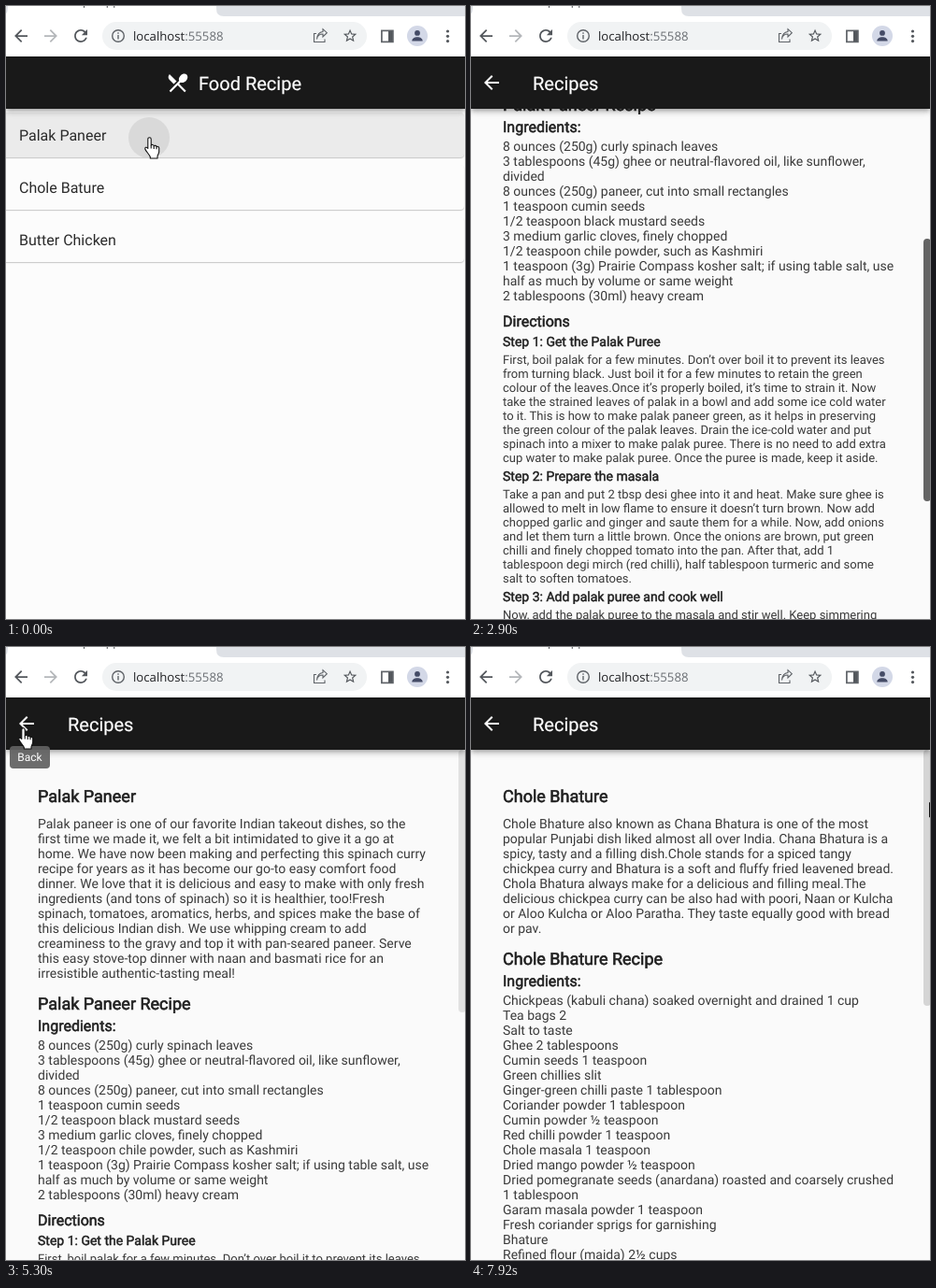
These frames come from a looping animation (491 px wide and 656 px high, 8 s). An HTML page:

```html
<!DOCTYPE html>
<html lang="en">
<head>
<meta charset="utf-8">
<title>Food Recipe</title>
<style>
html, body { margin: 0; width: 100%; height: 100%; overflow: hidden; background: #fff; }
body { position: relative; font-family: Roboto, sans-serif; color: #2b2b2b; text-rendering: geometricPrecision; }
svg { display: block; }
#chrome, #pointer { position: absolute; left: 0; top: 0; }
#pointer { overflow: visible; }
#app { position: absolute; left: 0; top: 54px; width: 491px; height: 602px; overflow: hidden; background: #fafafa; }
.page { position: absolute; inset: 0; overflow: hidden; background: #fafafa; }
#list { background: #fcfcfc; }
.bar {
  position: absolute; left: 0; top: 0; width: 491px; height: 56px;
  background: #191919; color: #fff; font-size: 20px; line-height: 58px; white-space: pre;
  box-shadow: 0 2px 4px -1px rgba(0,0,0,.2), 0 4px 5px rgba(0,0,0,.14), 0 1px 10px rgba(0,0,0,.12);
}
.bar span { position: absolute; left: 66px; -webkit-text-stroke: .2px; }
#list .bar span { left: 206px; }
.bar svg { position: absolute; left: 0; top: 0; }
.card {
  position: absolute; left: -4px; width: 494px; height: 48px; overflow: hidden; border-radius: 4px;
  box-shadow: 0 1px 1px rgba(0,0,0,.17), 0 1px 2px rgba(0,0,0,.06);
  background: #fcfcfc; font-size: 16px; line-height: 49px;
}
.card b { position: absolute; inset: 0; background: #000; opacity: 0; }
.card i { position: absolute; width: 44px; height: 44px; border-radius: 50%; background: rgba(0,0,0,.08); }
.card span { position: absolute; left: 18px; }
.text { position: absolute; left: 34px; top: 96px; white-space: pre; }
.text > * { margin: 0; font-weight: 400; }
h1, h2, h3, h4 { -webkit-text-stroke: .035em; color: #1f1f1f; }
.text h1, .text h2 { font-size: 18px; line-height: 21px; }
.text h2 { margin-top: 15px; }
.text h3 { font-size: 16px; line-height: 19px; margin-top: 3px; }
.text h3.far { margin-top: 10px; }
.text h4 { font-size: 14px; line-height: 16px; margin-top: 5px; }
.text p { position: relative; top: 1px; font-size: 14px; line-height: 16px; margin-top: 3px; color: #3a3a3a; }
.text h1 + p { margin-top: 10px; }
.text h4 + p { font-size: 13px; line-height: 15px; }
.thumb { position: absolute; left: 484px; top: 56px; width: 8px; border-radius: 4px; background: #000; }
#tip {
  position: absolute; left: 4px; top: 106px; width: 43px; height: 24px; border-radius: 4px;
  background: rgba(97,97,97,.93); color: #fff; font-size: 12px; line-height: 24px; text-align: center;
}
</style>
</head>
<body>
<svg id="chrome" width="491" height="54" fill="none" stroke-width="1.4">
  <path fill="#fff" d="M0 0h491v54H0z"/>
  <path fill="#dee1e6" d="M225 0h266v11h-258q-8 0-8-8zM0 0h2q0 7-2 8z"/>
  <text x="28" y="-1" font-family="Open Sans, sans-serif" font-size="12" fill="#45494d">Food Recipe App</text>
  <rect x="103" y="17" width="283" height="30" rx="15" fill="#f1f3f4"/>
  <g fill="#53575c">
    <path id="back" transform="translate(5.6 21.6) scale(.87)" d="M20 11H7.83l5.59-5.59L12 4l-8 8 8 8 1.41-1.41L7.83 13H20v-2z"/>
    <path transform="translate(58.4 21.6) scale(-.87 .87)" fill="#b4b7ba" d="M20 11H7.83l5.59-5.59L12 4l-8 8 8 8 1.41-1.41L7.83 13H20v-2z"/>
    <path transform="translate(69.6 21.6) scale(.87)" d="M17.65 6.35C16.2 4.9 14.21 4 12 4c-4.42 0-7.99 3.58-7.99 8s3.57 8 7.99 8c3.73 0 6.84-2.55 7.73-6h-2.08c-.82 2.33-3.04 4-5.65 4-3.31 0-6-2.69-6-6s2.69-6 6-6c1.66 0 3.14.69 4.22 1.78L13 11h7V4l-2.35 2.35z"/>
    <path transform="translate(359.4 23.2) scale(.72)" d="M22 9.24l-7.19-.62L12 2 9.19 8.63 2 9.24l5.46 4.73L5.82 21 12 17.27 18.18 21l-1.63-7.03L22 9.24zM12 15.4l-3.76 2.27 1-4.28-3.32-2.88 4.38-.38L12 6.1l1.71 4.04 4.38.38-3.32 2.88 1 4.28L12 15.4z"/>
    <path d="M409 26h5v13h-5z"/>
    <circle cx="472.5" cy="27" r="1.6"/><circle cx="472.5" cy="32.3" r="1.6"/><circle cx="472.5" cy="37.6" r="1.6"/>
  </g>
  <g stroke="#5f6368">
    <circle cx="120" cy="32" r="6.3"/>
    <path d="M120 31v4.5M120 28.2v1.5"/>
    <path stroke-width="1.1" d="M332 29.5h-2.500v9h11.500v-3M332.500 35.500c.5-3.500 3-5.500 6.500-5.500v3l4.300-4.300-4.300-4v2.800c-4 .5-6.200 3.500-6.500 8z"/>
    <rect x="401.9" y="26.4" width="12" height="12" stroke-width="1.7"/>
  </g>
  <text x="136" y="37" font-family="Open Sans, sans-serif" font-size="13.2" fill="#202124">localhost<tspan fill="#6a6e73">:55588</tspan></text>
  <circle cx="440" cy="32" r="11" fill="#d3d8e7"/>
  <path fill="#444b66" d="M440 26a2.9 2.9 0 0 1 0 5.8a2.9 2.9 0 0 1 0-5.8M434.3 37.5c0-5.6 11.4-5.6 11.4 0z"/>
</svg>

<div id="app">
  <div class="page" id="list">
    <div class="bar"><svg width="200" height="56"><path fill="#fff" transform="translate(170.7 15.2) scale(1.08)" d="M8.1 13.34l2.83-2.83L3.91 3.5c-1.56 1.56-1.56 4.09 0 5.66l4.19 4.18zm6.78-1.81c1.53.71 3.68.21 5.27-1.38 1.91-1.91 2.28-4.65.81-6.12-1.46-1.46-4.2-1.1-6.12.81-1.59 1.59-2.09 3.74-1.38 5.27L3.7 19.87l1.41 1.41L12 14.41l6.88 6.88 1.41-1.41L13.41 13l1.47-1.47z"/></svg><span>Food Recipe</span></div>
  </div>
  <div class="page recipe"><div class="text"><h1>Palak Paneer</h1><p>Palak paneer is one of our favorite Indian takeout dishes, so the
first time we made it, we felt a bit intimidated to give it a go at
home. We have now been making and perfecting this spinach curry
recipe for years as it has become our go-to easy comfort food
dinner. We love that it is delicious and easy to make with only fresh
ingredients (and tons of spinach) so it is healthier, too!Fresh
spinach, tomatoes, aromatics, herbs, and spices make the base of
this delicious Indian dish. We use whipping cream to add
creaminess to the gravy and top it with pan-seared paneer. Serve
this easy stove-top dinner with naan and basmati rice for an
irresistible authentic-tasting meal!</p><h2>Palak Paneer Recipe</h2><h3>Ingredients:</h3><p>8 ounces (250g) curly spinach leaves
3 tablespoons (45g) ghee or neutral-flavored oil, like sunflower,
divided
8 ounces (250g) paneer, cut into small rectangles
1 teaspoon cumin seeds
1/2 teaspoon black mustard seeds
3 medium garlic cloves, finely chopped
1/2 teaspoon chile powder, such as Kashmiri
1 teaspoon (3g) Prairie Compass kosher salt; if using table salt, use
half as much by volume or same weight
2 tablespoons (30ml) heavy cream</p><h3 class="far">Directions</h3><h4>Step 1: Get the Palak Puree</h4><p>First, boil palak for a few minutes. Don’t over boil it to prevent its leaves
from turning black. Just boil it for a few minutes to retain the green
colour of the leaves.Once it’s properly boiled, it’s time to strain it. Now
take the strained leaves of palak in a bowl and add some ice cold water
to it. This is how to make palak paneer green, as it helps in preserving
the green colour of the palak leaves. Drain the ice-cold water and put
spinach into a mixer to make palak puree. There is no need to add extra
cup water to make palak puree. Once the puree is made, keep it aside.</p><h4>Step 2: Prepare the masala</h4><p>Take a pan and put 2 tbsp desi ghee into it and heat. Make sure ghee is
allowed to melt in low flame to ensure it doesn’t turn brown. Now add
chopped garlic and ginger and saute them for a while. Now, add onions
and let them turn a little brown. Once the onions are brown, put green
chilli and finely chopped tomato into the pan. After that, add 1
tablespoon degi mirch (red chilli), half tablespoon turmeric and some
salt to soften tomatoes.</p><h4>Step 3: Add palak puree and cook well</h4><p>Now, add the palak puree to the masala and stir well. Keep simmering
the palak gravy until the water evaporates and palak is properly cooked.
Now add some milk to the palak puree. Milk is added to tone down the
bitterness of green palak leaves. Now keep stirring it until the milk
absorbs into the palak puree. Also, season it with salt, degi mirch,
kitchen king, garam masala, kasuri methi and dhaniya powder. Finally,
add some butter to the mixture to enhance its taste.</p><h4>Step 4: Add paneer cubes to cooked palak masala</h4><p>Now, add about 150 gms of palak cubes to the palak. Stir gently again to
let paneer absorb the masala while maintaining the uniform consistency
of the gravy. Lastly, add some cream to the mixture to enhance its taste
while giving a good texture to the dish.</p></div><div class="thumb" style="height:281px"></div></div>
  <div class="page recipe"><div class="text"><h1>Chole Bhature</h1><p>Chole Bhature also known as Chana Bhatura is one of the most
popular Punjabi dish liked almost all over India. Chana Bhatura is a
spicy, tasty and a filling dish.Chole stands for a spiced tangy
chickpea curry and Bhatura is a soft and fluffy fried leavened bread.
Chola Bhatura always make for a delicious and filling meal.The
delicious chickpea curry can be also had with poori, Naan or Kulcha
or Aloo Kulcha or Aloo Paratha. They taste equally good with bread
or pav.</p><h2>Chole Bhature Recipe</h2><h3>Ingredients:</h3><p>Chickpeas (kabuli chana) soaked overnight and drained 1 cup
Tea bags 2
Salt to taste
Ghee 2 tablespoons
Cumin seeds 1 teaspoon
Green chillies slit
Ginger-green chilli paste 1 tablespoon
Coriander powder 1 tablespoon
Cumin powder ½ teaspoon
Red chilli powder 1 teaspoon
Chole masala 1 teaspoon
Dried mango powder ½ teaspoon
Dried pomegranate seeds (anardana) roasted and coarsely crushed
1 tablespoon
Garam masala powder 1 teaspoon
Fresh coriander sprigs for garnishing
Bhature
Refined flour (maida) 2½ cups</p></div><div class="thumb" style="height:274px"></div></div>
</div>
<div id="tip">Back</div>
<svg id="pointer" width="20" height="26" fill="#fff" stroke="#111" stroke-linejoin="round">
  <path id="arrow" d="M.5 .5v15.5l3.600-3.300 2.500 5.800 2.400-1-2.500-5.700h5z"/>
  <g id="hand" transform="translate(-5.7 0)" stroke-width="1.1">
    <path d="M4 2.4a1.7 1.7 0 0 1 3.4 0V9c.4-1 2.900-.8 3 .8.5-.8 2.600-.6 2.800.8.8-.6 2.700-.2 2.700 1.500V16c0 2-1.700 3.500-1.700 5.200V23H6.500v-1.500C6 19.500 1.500 15 1 13c-.4-1.700 1.400-2.300 2.300-1.300l.7.8z"/>
    <path d="M7.4 9v3.5M10.400 10v3M13.200 10.800v2.500"/>
  </g>
</svg>
<script>
const LOOP = 8000, TRACK_RATIO = .5035;
const $ = id => document.getElementById(id);
const list = $('list'), recipes = [...document.querySelectorAll('.recipe')];

recipes.forEach(page => page.insertAdjacentHTML('beforeend',
  `<div class="bar"><svg width="56" height="56"><path fill="#fff" transform="translate(10 16)" d="${$('back').getAttribute('d')}"/></svg><span>Recipes</span></div>`));

const cards = ['Palak Paneer', 'Chole Bature', 'Butter Chicken'].map((name, row) => {
  const card = document.createElement('div');
  card.className = 'card';
  card.style.top = 60 + row * 56 + 'px';
  card.innerHTML = `<b></b><i></i><span>${name}</span>`;
  list.prepend(card);
  return card;
});

// Each track holds [start, ...values]; a value stays until the next start.
const pointer = [
  [0, 153.5, 140, 'hand'], [520, 230, 152, 'arrow'], [640, 340, 180, 'arrow'], [760, 436, 202, 'arrow'],
  [1070, 468, 178, 'arrow'], [1190, 487, 163, 'arrow'], [1460, 487, 167, 'arrow'], [1760, 488, 167, 'arrow'],
  [1880, 487, 167, 'arrow'], [2130, 486, 167, 'arrow'], [2400, 500, 180, 'arrow'],
  [4630, 352, 138, 'arrow'], [4780, 220, 127, 'arrow'], [4900, 90, 108, 'arrow'],
  [5030, 18, 89, 'hand'], [5180, 17, 87, 'hand'], [5300, 18.5, 86, 'hand'],
  [6090, 110, 150, 'hand'], [6220, 200, 219, 'hand'], [6340, 140, 203, 'hand'],
  [6460, 88, 191, 'hand'], [6610, 86, 191, 'hand'], [7370, 265, 180, 'arrow'],
  [7510, 380, 176, 'arrow'], [7630, 474, 171, 'arrow'], [7770, 490, 166, 'arrow']
];
const scroll = [
  [0, 0], [2400, 50], [2530, 150], [2650, 230], [2900, 276], [3020, 345], [3140, 415], [3260, 490],
  [3410, 526], [3810, 505], [3930, 451], [4060, 280], [4210, 80], [4330, 0]
];
const thumbAlpha = [
  [0, .1], [1340, .13], [1460, .35], [1610, .5], [2400, .6], [4480, .1], [7920, .15]
];
// recipe index, recipe scale, recipe opacity, list scale
const route = [
  [0, -1, 1, 0, 1], [250, 0, .96, .85, 1.03], [370, 0, 1, 1, 1],
  [5700, 0, .96, .6, 1.03], [5820, 0, .92, 0, 1.01], [5940, -1, 1, 0, 1],
  [7120, 1, .95, .7, 1.03], [7240, 1, .99, 1, 1.05], [7370, 1, 1, 1, 1]
];
// row, shade, ripple visible
const touch = [
  [0, 0, .065, 1], [370, -1, 0, 0], [6090, 0, .04, 0], [6220, -1, 0, 0],
  [6340, 1, .04, 0], [6870, 1, .065, 1], [7370, -1, 0, 0]
];

const at = (track, t) => track.filter(key => key[0] <= t).pop().slice(1);

function draw(t) {
  const [x, y, shape] = at(pointer, t);
  $('pointer').style.transform = `translate(${x}px, ${y}px)`;
  $('arrow').style.display = shape === 'arrow' ? '' : 'none';
  $('hand').style.display = shape === 'hand' ? '' : 'none';

  const [open, scale, opacity, listScale] = at(route, t);
  list.style.transform = `scale(${listScale})`;
  const [offset] = at(scroll, t), [alpha] = at(thumbAlpha, t);
  recipes.forEach((page, i) => {
    page.style.display = i === open ? '' : 'none';
    page.style.transform = `scale(${scale})`;
    page.style.opacity = opacity;
    page.querySelector('.text').style.transform = `translateY(${-offset}px)`;
    const thumb = page.querySelector('.thumb');
    thumb.style.transform = `translateY(${offset * TRACK_RATIO}px)`;
    thumb.style.opacity = alpha;
  });

  const [row, shade, ripple] = at(touch, t);
  cards.forEach((card, i) => {
    const [cover, ring] = card.children;
    cover.style.opacity = i === row ? shade : 0;
    ring.style.display = i === row && ripple ? '' : 'none';
    ring.style.left = x - 18.5 + 'px';
    ring.style.top = y - 135 - i * 56 + 'px';
  });
  $('tip').style.display = t >= 5030 && t < 5700 ? '' : 'none';
}

const start = performance.now();
function tick() {
  draw((performance.now() - start) % LOOP);
  requestAnimationFrame(tick);
}
tick();
</script>
</body>
</html>
```
